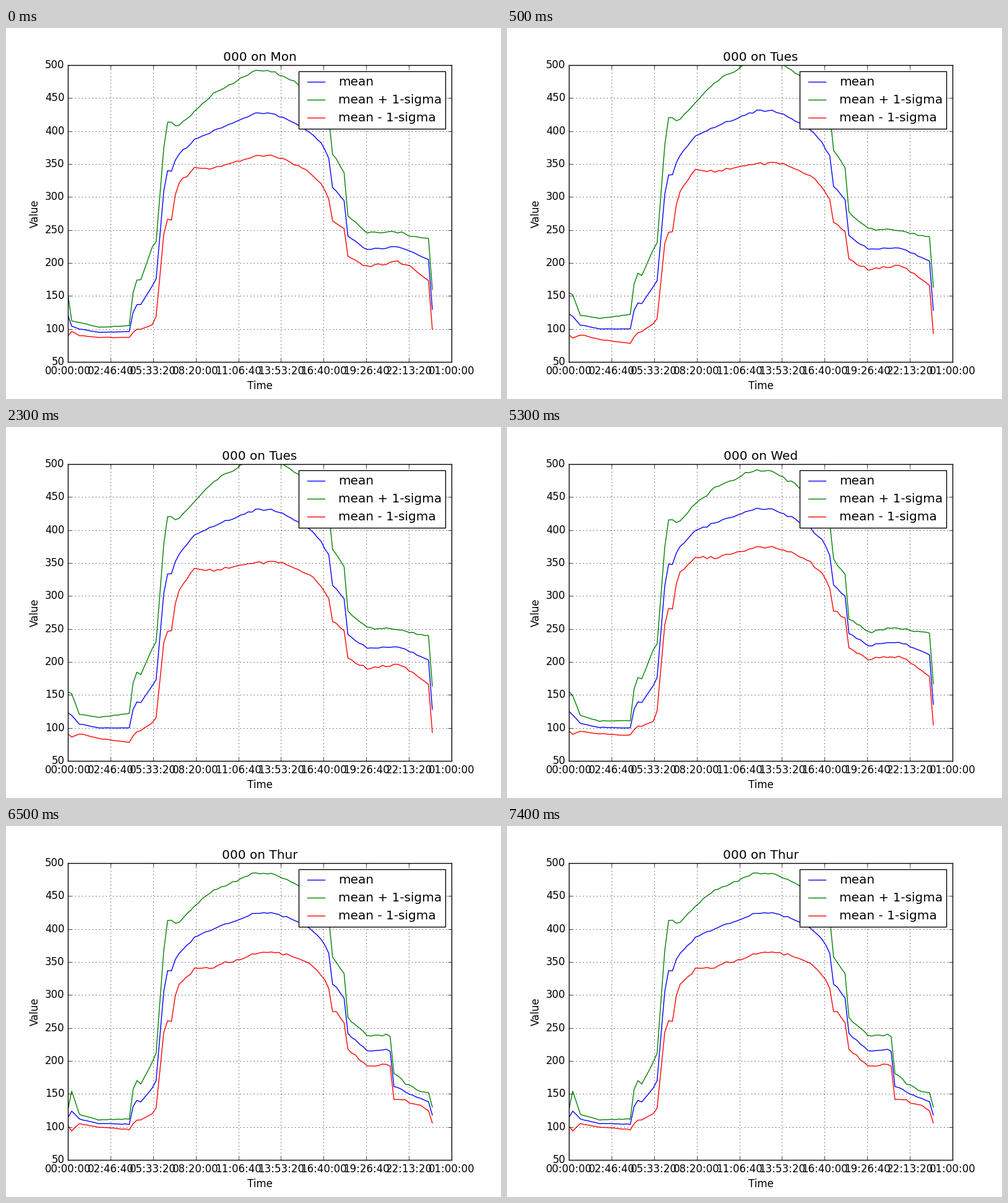
A matplotlib script for the animation above (8000 ms loop, 800 by 600 pixels).

```python
import numpy as np
import matplotlib.pyplot as plt
from matplotlib.animation import FuncAnimation
from matplotlib.lines import Line2D
from matplotlib.patches import Rectangle

W, H, DPI = 800, 600, 100
STEP_MS, FRAMES = 500, 16
SLOT = 900  # seconds between samples
SLOTS = np.arange(96)

plt.style.use("classic")
plt.rcParams["font.family"] = "DejaVu Sans"

# Typical day: slot, mean, sigma at the bends of the curve.
PROFILE = np.array([
    (0, 122, 30), (1, 117, 30), (3, 106, 12), (8, 100, 10), (16, 100, 12),
    (17, 128, 32), (18, 139, 38), (19, 138, 37), (22, 163, 55), (23, 174, 54),
    (25, 309, 66), (26, 340, 76), (27, 340, 76), (28, 357, 54), (29, 367, 46),
    (33, 391, 45), (38, 405, 59), (49, 429, 67), (53, 429, 65), (58, 418, 62),
    (63, 401, 59), (66, 384, 59), (68, 362, 57), (69, 316, 46), (72, 297, 40),
    (73, 242, 28), (78, 222, 25), (86, 226, 23), (89, 219, 25), (94, 206, 34),
    (95, 131, 32)]).T

# Slots at which a day's shift from the typical one is given.
ANCHORS = (0, 1, 3, 16, 22, 26, 33, 50, 68, 89)


def day(name, seed, mean_shift, sigma_shift, quiet_evening=False):
    """Return the day's name and its mean, upper and lower curves."""
    rng = np.random.default_rng(seed)
    jitter = np.where((SLOTS > 29) & (SLOTS < 92), 0.8, 0.2)
    curves = []
    for typical, shift in zip(PROFILE[1:], (mean_shift, sigma_shift)):
        curves.append(np.interp(SLOTS, PROFILE[0], typical)
                      + np.interp(SLOTS, ANCHORS, shift)
                      + jitter * rng.normal(size=SLOTS.size))
    mean, sigma = curves
    if quiet_evening:
        mean[85:95] -= 55
        sigma -= np.clip(2.5 * (SLOTS - 84), 0, 20)
    return name, (mean, mean + sigma, mean - sigma)


DAYS = (
    day("Mon", 1, (-1, -13, -6, -4, 2, 0, -5, -2, -2, -1),
        (2, -22, -2, -3, 4, -2, -2, -2, 4, -2)),
    day("Tues", 2, (1, 2, 0, 0, 1, -7, 1, 2, 0, -3),
        (2, 3, 3, 10, 1, 11, 6, 14, 9, 3)),
    day("Wed", 3, (3, 3, 1, 0, 1, 8, 8, 3, 1, 5),
        (0, -1, 0, -1, -1, -9, -5, -8, -8, -1)),
    day("Thur", 4, (-8, 7, 6, 4, -4, -3, -4, -5, 2, -13),
        (-18, 0, -5, -4, -16, 0, 2, -6, -5, 0), quiet_evening=True),
)


def clock(seconds):
    return f"{seconds // 3600 % 24:02d}:{seconds // 60 % 60:02d}:{seconds % 60:02d}"


fig = plt.figure(figsize=(W / DPI, H / DPI), dpi=DPI, facecolor="white")
ax = fig.add_axes([0.125, 0.1, 0.775, 0.8])
ax.set_xlim(0, 90000)
ax.set_ylim(50, 500)
times = range(0, 90001, 10000)
ax.set_xticks(times, [clock(t) for t in times])
ax.set_yticks(range(50, 501, 50))
ax.set_xlabel("Time")
ax.set_ylabel("Value")
title = ax.set_title("")
ax.grid(True)

# Legend, placed in pixels from the top left corner.
fig.add_artist(Rectangle((473 / W, 1 - 163 / H), 237 / W, 93 / H, fc="w",
                         ec="k", lw=1, transform=fig.transFigure))
SERIES = (("mean", "b"), ("mean + 1-sigma", "g"), ("mean - 1-sigma", "r"))
curves = []
for row, (name, color) in enumerate(SERIES):
    y = 87 + 29 * row
    fig.add_artist(Line2D([487 / W, 515 / W], [1 - y / H] * 2, color=color,
                          lw=1, transform=fig.transFigure))
    fig.text(537 / W, 1 - (y + 6) / H, name, fontsize="large", va="baseline")
    curves += ax.plot([], [], color=color, lw=1)


def update(k):
    name, values = DAYS[(k * STEP_MS + 2500) // 3000]
    title.set_text(f"000 on {name}")
    for curve, ys in zip(curves, values):
        curve.set_data(SLOTS * SLOT, ys)
    return [title, *curves]


anim = FuncAnimation(fig, update, frames=FRAMES, interval=STEP_MS,
                     repeat=True, repeat_delay=0, blit=False)
plt.show()
```
